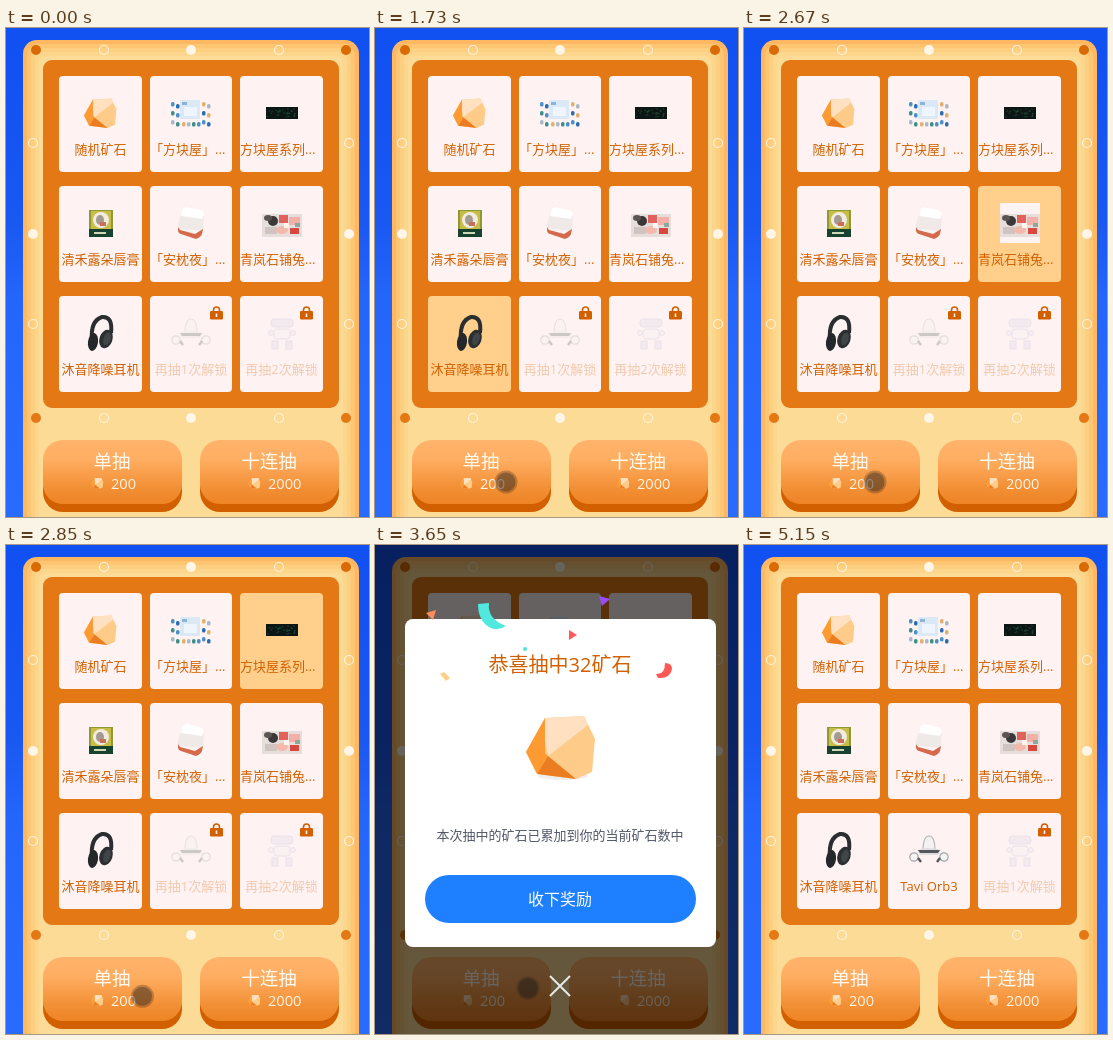
Animation, 363 px wide and 489 px high, one loop 6.88 s. Source, as an HTML page:

```html
<!DOCTYPE html>
<html lang="zh-CN">
<head>
<meta charset="utf-8">
<title>抽奖</title>
<style>
  html, body { margin: 0; width: 100%; height: 100%; overflow: hidden; background: #1555f2; }
  svg { display: block; }
  text { font-family: "Open Sans", "Noto Sans CJK SC", "Noto Sans CJK", sans-serif; text-anchor: middle; }
  .label { font-size: 13px; fill: #d26000; }
  .clipped { text-anchor: start; }
  .locked .label, .locked .icon { opacity: .28; }
  .draw { font-size: 18.5px; fill: #fffaf0; }
  .price { font-size: 14.6px; fill: #fff4e3; text-anchor: start; }
</style>
</head>
<body>
<svg width="363" height="489" viewBox="0 0 363 489">
  <defs>
    <linearGradient id="sky" x2="0" y2="1">
      <stop offset="0" stop-color="#1150f1"/><stop offset=".4" stop-color="#1a58f2"/>
      <stop offset=".55" stop-color="#2465fb"/><stop offset="1" stop-color="#2a6bff"/>
    </linearGradient>
    <linearGradient id="face" x2="0" y2="1">
      <stop offset="0" stop-color="#ffb36b"/><stop offset=".3" stop-color="#ffae62"/>
      <stop offset=".75" stop-color="#f28f35"/><stop offset="1" stop-color="#ee8425"/>
    </linearGradient>
    <g id="ore">
      <path d="M19 2 58 0 69 23 66 56 50 63 11 58 0 36Z" fill="#ffcb88"/>
      <path d="M19 2 58 0 62 9 22 40 19 24Z" fill="#ffe0c0"/>
      <path d="M19 2 19 37 22 40 11 58 0 36Z" fill="#fd9a32"/>
      <path d="M22 40 50 63 11 58Z" fill="#ec7c20"/>
    </g>
    <g id="lock">
      <path d="M-3-1V-3A3 3 0 0 1 3-3V-1" fill="none" stroke="#d26000" stroke-width="1.6"/>
      <rect x="-6.5" y="-2" width="13" height="8.5" rx="1.2" fill="#d26000"/>
      <path d="M0 .5V4" stroke="#fef3f2" stroke-width="1.6"/>
    </g>
  </defs>

  <rect width="363" height="489" fill="url(#sky)"/>
  <g id="frame"></g>
  <rect x="37" y="32" width="296" height="348" rx="9" fill="#e37814"/>
  <g id="bulbs"></g>
  <g id="cells"></g>
  <g id="buttons"></g>
  <rect id="press" x="37" y="412" width="139" height="66" rx="20" fill="#000" opacity=".1"/>

  <g id="modal">
    <rect width="363" height="489" fill="#000" opacity=".6"/>
    <rect x="30" y="74" width="311" height="328" rx="8" fill="#fff"/>
    <path d="M103 59 114 58Q112 74 131 81 121 88 111 80 103 73 103 59Z" fill="#50e8df"/>
    <path d="M51 68 61 65 58 75Z" fill="#ff8b5c"/>
    <path d="M224 51 235 54 227 61Z" fill="#9a4df5"/>
    <path d="M194 85 202 90 194 95Z" fill="#ff5a5a"/>
    <path d="M290 118Q297 118 297 124 295 134 283 133L281 129Q290 130 290 118Z" fill="#ff5656"/>
    <path d="M65 129 69 127 75 133 71 136Z" fill="#ffcf87"/>
    <circle cx="150" cy="104" r="2" fill="#4ce4dc"/>
    <text x="185" y="127" font-size="20" fill="#d26000">恭喜抽中32矿石</text>
    <ellipse cx="188" cy="231" rx="25" ry="4" fill="#eee"/>
    <use href="#ore" x="151" y="171"/>
    <text x="185" y="295" font-size="13" fill="#515767">本次抽中的矿石已累加到你的当前矿石数中</text>
    <rect x="50" y="330" width="271" height="48" rx="24" fill="#1e80ff"/>
    <text x="185" y="360" font-size="16" font-weight="500" fill="#fff">收下奖励</text>
    <path d="M175 431 195 451M195 431 175 451" stroke="#e8e8e8" stroke-width="2"/>
  </g>

  <g id="cursor">
    <circle r="11.5" fill="#1a1a1a" opacity=".28"/>
    <circle r="9.5" fill="#1a1a1a" opacity=".36"/>
  </g>
</svg>

<script>
const LOOP = 6880;
const $ = id => document.getElementById(id);

let seed = 7;
const random = () => (seed = seed * 16807 % 2147483647) / 2147483647;
const repeat = (count, draw) => Array.from({ length: count }, (_, i) => draw(i)).join('');
const rect = (x, y, w, h, fill, extra = '') =>
  `<rect x="${x}" y="${y}" width="${w}" height="${h}" fill="${fill}" ${extra}/>`;
const path = (d, fill, extra = '') => `<path d="${d}" fill="${fill}" ${extra}/>`;
const oval = (x, y, rx, ry, fill, turn = 0) =>
  `<ellipse rx="${rx}" ry="${ry}" fill="${fill}" transform="translate(${x} ${y}) rotate(${turn})"/>`;

// Icons are centred on 0,0 in a 40 px square.
const palette = ['#4b8fc9', '#e0b070', '#3c8f86', '#2b6cb0', '#a9b8c9'];
const icons = {
  ore: '<use href="#ore" transform="translate(-17 -14.5) scale(.47)"/>',
  stickers: rect(-11, -13, 20, 19, '#dbe9f6', 'rx="1"') + rect(-9, -11, 5, 3, '#8fb3d4') +
    rect(-7, -6, 13, 9, '#eef5fc') +
    repeat(16, i => {
      const [x, y] = i < 12 ? [[-20, -15, 11, 16][i % 4], -11 + (i >> 2) * 9 + i % 2 * 2] : [-9 + (i - 12) * 5, 9];
      return rect(x, y, 3.5, 4.5, palette[i * 3 % 5], 'rx="1.5"');
    }),
  board: rect(-16, -6, 32, 12, '#0c1715') +
    repeat(30, () => rect(-15 + random() * 29, -5 + random() * 9, 1.4, 1, '#1c4c34')),
  balm: rect(-12, -13, 24, 27, '#8c9a36') + rect(-10, -12, 20, 18, '#c9bd4a') +
    oval(0, -3, 8, 8, '#f2ecdf') + oval(-1, -3, 4, 5, '#a39a92') + rect(-1, -1, 6, 4, '#c9705a') +
    rect(-12, 6, 24, 8, '#17422f') + rect(-7, 9, 12, 2, '#cfd8b4'),
  box: path('M-9-12Q-8-16-4-16L9-13Q13-12 13-8L12 8-10 6Q-14 5-13 1Z', '#efe9e8') +
    path('M-9-12Q-8-16-4-16L9-13Q13-12 13-8L11-4-10-7Z', '#fff') +
    path('M-13 4-11 7 4 11 12 6 11 11Q10 14 5 16L-10 11Q-13 10-13 7Z', '#d5694b'),
  gift: rect(-20, -20, 40, 40, '#fdf3f2') + rect(-20, -9, 40, 23, '#e6dedb') +
    oval(-9, -2, 5, 5, '#3a3838') + oval(-14, -5, 4, 3, '#5b5552') + rect(-3, -8, 9, 8, '#e0625a') +
    rect(7, -6, 11, 8, '#f2b0a6') + rect(-17, 4, 12, 7, '#cfc4c0') + oval(0, 7, 6, 4, '#f4b9ad') +
    rect(8, 5, 9, 6, '#d9483f') + rect(2, 0, 5, 5, '#fff4ee') + rect(13, 0, 5, 4, '#8fa89d'),
  phones: path('M-9 8Q-11-12 1-16 12-17 10 0', 'none', 'stroke="#2b2e30" stroke-width="4"') +
    oval(-8, 9, 5, 9, '#25282a', 8) + oval(5, 6, 6.5, 9.5, '#2b2f31', 18) + oval(6, 6, 3.5, 6.5, '#404548', 18),
  headset: path('M-6 1Q-6-14 0-14 6-14 6 1', '#f3f1f1', 'stroke="#b5b5b8" stroke-width="1.2"') +
    path('M-12 0Q0-4 12 0L9 5H-9Z', '#dedee0') + path('M-11 0H11L9 3H-9Z', '#55575b') +
    '<g fill="#f4f4f4" stroke="#a5a5a8" stroke-width="1.2"><circle cx="-15" cy="7" r="4.2"/><circle cx="15" cy="7" r="4.2"/></g>' +
    path('M-11 8-8 12M11 8 8 12', 'none', 'stroke="#55575b" stroke-width="2.4"'),
  robot: '<g fill="#e9e5f6" stroke="#bbb4d6" stroke-width="1">' +
    rect(-11, -14, 22, 8, '#d9d4ee', 'rx="3"') + rect(-8, -4, 16, 10, '#f0edf9', 'rx="3"') +
    rect(-10, 8, 6, 8, '#d9d4ee') + rect(4, 8, 6, 8, '#d9d4ee') +
    '<circle cx="-11" cy="0" r="2.5"/><circle cx="11" cy="0" r="2.5"/></g>',
};

const prizes = [
  ['ore', '随机矿石'], ['stickers', '「方块屋」...'], ['board', '方块屋系列...'],
  ['balm', '清禾露朵唇膏'], ['box', '「安枕夜」...'], ['gift', '青岚石铺兔...'],
  ['phones', '沐音降噪耳机'], ['headset', 'Tavi Orb3'], ['robot', ''],
];

function prizeCell([icon, name], i) {
  const left = 53 + i % 3 * 90.5;
  const x = Math.round(left);
  const width = Math.round(left + 82.7) - x;
  const clipped = name.endsWith('...');
  return `
  <g transform="translate(${x} ${48 + Math.floor(i / 3) * 110})">
    <rect class="tile" width="${width}" height="96" rx="4" fill="#fef3f2"/>
    <g class="icon" transform="translate(${Math.round(width / 2)} 37)">${icons[icon]}</g>
    <text class="label ${clipped ? 'clipped' : ''}" x="${clipped ? 0 : width / 2}" y="78">${name}</text>
    ${i > 6 ? '<use class="padlock" href="#lock" x="66.5" y="17"/>' : ''}
  </g>`;
}
$('cells').innerHTML = prizes.map(prizeCell).join('');

// Nested bands shade the frame from its edge inwards.
$('frame').innerHTML = ['#ffb861', '#fec673', '#fdcf81', '#fcd68c', '#fbdb95'].map((fill, i) =>
  rect(17 + i * 4, 12 + i * 4, 336 - i * 8, 500, fill, `rx="${14 - i * 2}"`)).join('');

const bulbFill = { full: '#fff6e8', top: '#d96a06', bottom: '#e37814' };
const bulb = (x, y, kind) => kind === 'ring'
  ? `<circle cx="${x}" cy="${y}" r="4.5" fill="none" stroke="#fff3de" stroke-width="1.2"/>`
  : oval(x, y, 5, 5, bulbFill[kind]);
const bulbRow = (y, corner) => [30, 98, 185, 273, 340].map((x, i) =>
  bulb(x, y, [corner, 'ring', 'full', 'ring', corner][i])).join('');
const bulbColumn = x => [115, 206, 296].map((y, i) => bulb(x, y, i === 1 ? 'full' : 'ring')).join('');
$('bulbs').innerHTML = bulbRow(22, 'top') + bulbRow(390, 'bottom') + bulbColumn(27) + bulbColumn(343);

const button = (x, title, price) => `
  <g transform="translate(${x} 412)">
    <rect y="30" width="139" height="42" rx="20" fill="#d26000"/>
    <rect width="139" height="64" rx="20" fill="url(#face)"/>
    <text class="draw" x="69" y="27.5">${title}</text>
    <use href="#ore" transform="translate(48.5 38) scale(.17)"/>
    <text class="price" x="68" y="49">${price}</text>
  </g>`;
$('buttons').innerHTML = button(37, '单抽', 200) + button(194, '十连抽', 2000);

const cells = [...$('cells').children];
const tiles = cells.map(cell => cell.querySelector('.tile'));

function setLocked(index, text, locked) {
  const cell = cells[index];
  cell.classList.toggle('locked', locked);
  cell.querySelector('.padlock').style.display = locked ? '' : 'none';
  cell.querySelector('.label').textContent = text;
}

const slowSteps = [1120, 1210, 1310, 1400, 1550, 1640, 1730, 1820];
function litCell(t) {
  if (t < 1120 || t >= 3130) return -1;
  const step = t < 1820 ? slowSteps.filter(s => s <= t).length - 1
    : t < 2250 ? 7 + Math.floor((t - 1820) / 53.75)
    : 15 + Math.floor((t - 2241) / 38.3);
  return step % 7;
}

const clamp = v => Math.max(0, Math.min(1, v));
const smooth = v => v * v * (3 - 2 * v);
const route = [
  [280, 3, 485], [700, 131, 454], [2760, 131, 454],
  [3040, 153, 443], [3650, 153, 443], [4210, 260, 359.5],
];
function cursorAt(t) {
  let i = 0;
  while (i < route.length - 2 && t >= route[i + 1][0]) i++;
  const [t0, x0, y0] = route[i], [t1, x1, y1] = route[i + 1];
  const k = smooth(clamp((t - t0) / (t1 - t0)));
  return [x0 + (x1 - x0) * k, y0 + (y1 - y0) * k];
}

function render(t) {
  const lit = litCell(t);
  tiles.forEach((tile, i) => tile.setAttribute('fill', i === lit ? '#ffcf8b' : '#fef3f2'));

  const won = t >= 3130;
  setLocked(7, won ? prizes[7][1] : '再抽1次解锁', !won);
  setLocked(8, won ? '再抽1次解锁' : '再抽2次解锁', true);

  const tapping = t >= 930 && t < 1120;
  $('press').style.display = tapping ? '' : 'none';

  const shown = clamp((t - 3085) / 140) * (1 - clamp((t - 4865) / 280));
  $('modal').style.opacity = shown;
  $('modal').style.display = shown ? '' : 'none';

  const [x, y] = cursorAt(t);
  $('cursor').setAttribute('transform', `translate(${x} ${y})`);
  $('cursor').style.display = t >= 280 && t < 4930 ? '' : 'none';
  $('cursor').style.opacity = tapping || t >= 4350 ? 1 : .9;
}

const start = performance.now();
function tick() {
  render((performance.now() - start) % LOOP);
  requestAnimationFrame(tick);
}
tick();
</script>
</body>
</html>
```
